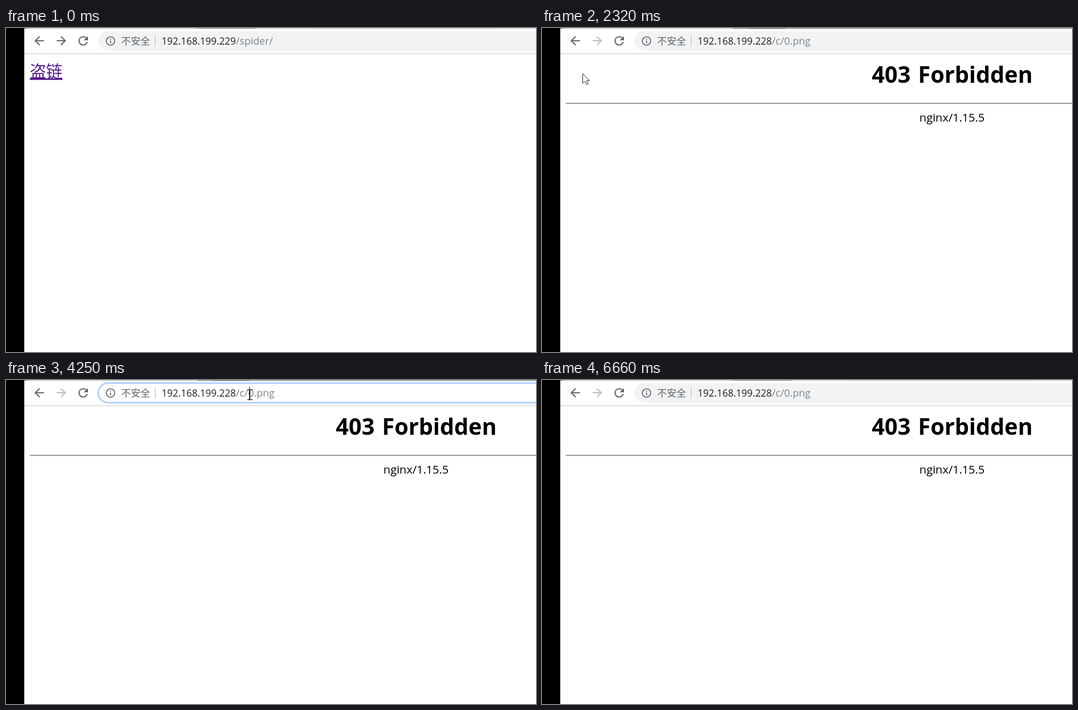
Write an HTML page that moves like this. It is 957 px wide and 585 px high and loops after 6.83 s.

```html
<!DOCTYPE html>
<html lang="zh-CN">
<head>
<meta charset="utf-8">
<style>
html, body { margin: 0; width: 100%; height: 100%; overflow: hidden; background: #fff; }
svg { display: block; font-family: "Open Sans", "Noto Sans", sans-serif; }
.cjk { font-family: "Noto Sans CJK SC", "Noto Sans CJK", sans-serif; }
.cursor path { fill: #fff; stroke: #222; stroke-linejoin: round; }
</style>
</head>
<body>
<svg width="957" height="585" viewBox="0 0 957 585">
  <defs>
    <path id="arrow" d="M20 11H7.83l5.59-5.59L12 4l-8 8 8 8 1.41-1.41L7.83 13H20z"/>
  </defs>
  <rect width="957" height="585" fill="#fff"/>

  <!-- strip above the toolbar -->
  <rect x="33" width="924" height="1.5" fill="#c3cccd"/>
  <g id="lightStrip">
    <rect x="345" width="105" height="1" fill="#8d8a89"/>
    <rect x="552" width="335" height="1" fill="#b4c1c1"/>
  </g>
  <g id="darkStrip">
    <rect x="345" width="612" height="1.3" fill="#838c8e"/>
    <rect x="372" width="68" height="1.3" fill="#707577"/>
  </g>
  <rect x="33" width="4" height="1" fill="#555"/>

  <!-- toolbar -->
  <g fill="#5f6368">
    <use href="#arrow" transform="translate(47.2 10.3) scale(1.06)"/>
    <use id="forward" href="#arrow" transform="translate(112.6 10.3) scale(-1.06 1.06)"/>
    <path transform="translate(126.8 10.5) scale(1.06)" d="M17.65 6.35C16.2 4.9 14.21 4 12 4c-4.42 0-7.99 3.58-7.99 8s3.57 8 7.99 8c3.73 0 6.84-2.55 7.73-6h-2.08c-.82 2.33-3.04 4-5.65 4-3.31 0-6-2.69-6-6s2.69-6 6-6c1.66 0 3.14.69 4.22 1.78L13 11h7V4z"/>
  </g>
  <rect id="bar" x="167" y="6" width="900" height="35" rx="17.5"/>
  <rect id="ring" x="166.5" y="5.5" width="900" height="35.5" rx="17.7" fill="#fff" stroke="#b3cffa" stroke-width="2.8"/>
  <circle cx="188.7" cy="23.6" r="7.6" fill="none" stroke="#5f6368" stroke-width="1.7"/>
  <path d="M188.7 22.6v5.2M188.7 19.2v1.9" stroke="#5f6368" stroke-width="1.8"/>
  <text class="cjk" x="208" y="30" font-size="17.4" fill="#5f6368">不安全</text>
  <rect x="269" y="13" width="1" height="20" fill="#b4b7ba"/>
  <rect id="selection" x="281" y="11" width="205" height="24" fill="#3399ff"/>
  <text id="host" x="281" y="29.6" font-size="17.5"></text>
  <text id="path" x="415" y="29.6" font-size="18.3"></text>
  <rect x="33" y="46" width="924" height="1" fill="#c6c8c9"/>

  <!-- pages -->
  <g id="linkPage" fill="#551a8b">
    <text class="cjk" x="43" y="89" font-size="29.5">盗链</text>
    <rect x="43" y="91" width="59" height="2.7"/>
  </g>
  <g id="errorPage">
    <g text-anchor="middle">
      <text x="740.8" y="99" font-size="40.8" font-weight="700" word-spacing="3">403 Forbidden</text>
      <text x="740.4" y="168.6" font-size="20.5">nginx/1.15.5</text>
    </g>
    <rect x="43" y="135" width="914" height="2" fill="#9c9c9c"/>
    <rect x="44" y="137" width="913" height="1" fill="#eee"/>
  </g>

  <rect id="caret" x="439" y="12" width="1" height="23" fill="#222"/>
  <g class="cursor" id="pointer"><path d="M0 0V17.5l4.2-3.9 2.9 6 2.7-1.2-2.8-5.9h5.5z"/></g>
  <g class="cursor" id="hand">
    <path d="M-2 15.5V1.8q0-1.8 1.7-1.8t1.7 1.8V9q.3-1.2 1.6-1 1.4.2 1.5 1.6.5-1 1.6-.7 1.3.3 1.4 1.8.8-.6 1.6 0 1 .6.9 2V17.5Q10 20 8 22V24H-2.5V22Q-4 19-6 15.5-7 13-5.4 12.3-4 12-2 15.5Z"/>
    <path d="M1.4 9v4M4.5 10v3M7.5 11v3"/>
  </g>
  <g id="beam"><path d="M-4.5-9h3.5l1 1 1-1h3.5M0-8V8M-4.5 9h3.5l1-1 1 1h3.5" fill="none" stroke="#222" stroke-width="1.3"/></g>
  <rect width="33" height="585" fill="#000"/>
</svg>
<script>
const LOOP = 6830, ENTER = 130, LOAD = 1620, FOCUS = 3900, SELECT = 4420, BLUR = 5500, LEAVE = 6360, SETTLE = 6660;

// Mouse moves: first step, last step, number of steps, end point
const moves = [
  [130, 760, 9, 167, 126],
  [820, 1040, 4, 71, 88],
  [1120, 1120, 1, 79, 84],
  [1230, 1230, 1, 77, 80],
  [2320, 2320, 1, 73, 82],
  [2380, 2910, 8, 392, 32],
  [3020, 3160, 3, 408, 29],
  [3250, 3550, 4, 436, 27],
  [3900, 4250, 5, 440, 26],
  [4750, 5030, 4, 451, 27],
  [5150, 5380, 4, 773, 88],
  [5740, 6130, 6, 846, 550],
  [6300, 6300, 1, 871, 570]
];

const $ = id => document.getElementById(id);
const show = (id, on) => $(id).style.display = on ? "" : "none";
const ease = p => p * p * (3 - 2 * p);

function mouseAt(t) {
  let x = 840, y = 570;
  for (const [start, end, steps, toX, toY] of moves) {
    if (t < start) break;
    const step = end > start ? Math.floor((t - start) / (end - start) * (steps - 1) + 1e-6) : 0;
    const p = ease(Math.min(1, (step + 1) / steps));
    x += (toX - x) * p;
    y += (toY - y) * p;
  }
  return [x, y];
}

function cursorKind(t, x, y, selected) {
  if (t < ENTER || t >= LEAVE) return "";
  if (t < 2320 && x > 43 && x < 102 && y < 97) return "hand";
  if (y < 41 && !(selected && x > 281 && x < 486)) return "beam";
  return "pointer";
}

function draw(t) {
  const loaded = t >= LOAD;
  const focused = t >= FOCUS && t < BLUR;
  const selected = t >= SELECT && t < BLUR;
  const dark = loaded && t < SETTLE;
  const [x, y] = mouseAt(t);
  const kind = cursorKind(t, x, y, selected);

  show("linkPage", !loaded);
  show("errorPage", loaded);
  show("lightStrip", !dark);
  show("darkStrip", dark);
  show("ring", focused);
  show("selection", selected);
  show("caret", focused && !selected);
  $("forward").setAttribute("fill", loaded ? "#babcbe" : "#5f6368");
  $("bar").setAttribute("fill", kind === "beam" ? "#e8eaed" : "#f1f3f4");
  $("host").textContent = loaded ? "192.168.199.228" : "192.168.199.229";
  $("path").textContent = loaded ? "/c/0.png" : "/spider/";
  $("host").setAttribute("fill", selected ? "#fff" : "#202124");
  $("path").setAttribute("fill", selected ? "#fff" : "#80868b");

  for (const id of ["pointer", "hand", "beam"]) {
    show(id, id === kind);
    $(id).setAttribute("transform", `translate(${Math.round(x) + .5} ${Math.round(y) + .5})`);
  }
}

const begin = performance.now();
function tick() {
  draw((performance.now() - begin) % LOOP);
  requestAnimationFrame(tick);
}
tick();
</script>
</body>
</html>
```
